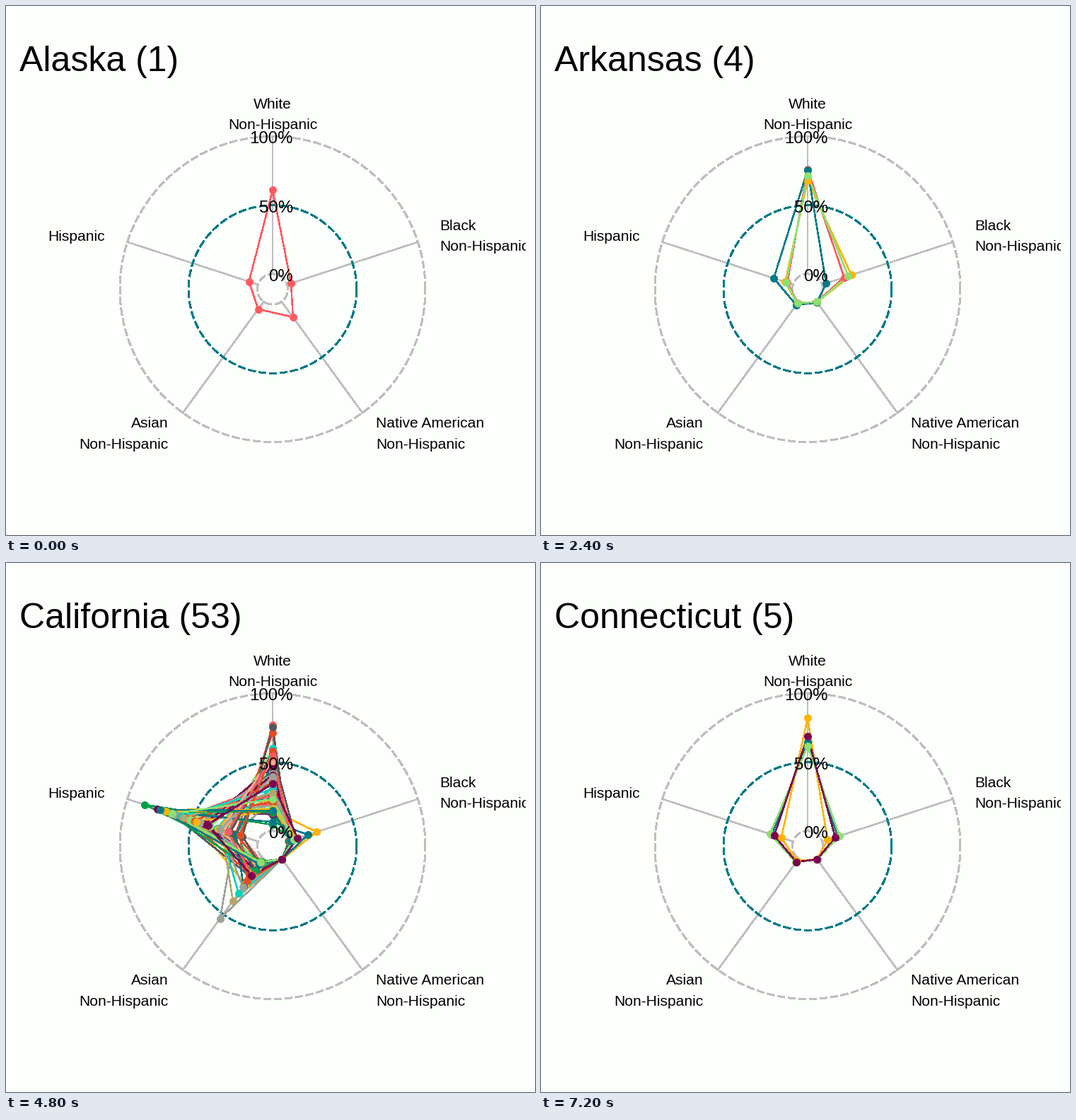
A matplotlib script that plays this animation: 748 by 748 pixels, repeating every 8 s.

```python
import numpy as np
import matplotlib.pyplot as plt
from matplotlib.animation import FuncAnimation
from matplotlib.patches import Rectangle

SIZE, DPI = 748, 88
PX = 72 / DPI                      # points per pixel
CX, CY = 377, 400.5
R0, R100 = 21.6, 216
BACK, GRID, MID = "#fdfffc", "#bebebe", "#007a87"
PALETTE = ["#ff5a5f", "#ffb400", "#007a87", "#8ce071", "#7b0051", "#00d1c1",
           "#ffaa91", "#b4a76c", "#9ca299", "#565a5c", "#00a04b", "#e54c20"]
HOLD, STEP, LOOP = 1200, 400, 8000
ANGLES = np.arange(5) * 2 * np.pi / 5


def district(white, black, native=None, asian=None, hispanic=None):
    """Percent on each axis; shares not given follow from the remainder."""
    rest = 100 - white - black - (native or 0)
    if asian is not None:
        hispanic = rest - asian - 1 - .06 * white
    elif hispanic is None:
        hispanic = rest * (.58 + .005 * rest)
    left = rest - hispanic
    if asian is None:
        asian = .45 * left
    if native is None:
        native = .1 * left
    return white, black, native, asian, hispanic


def state(whites, slope, base, **special):
    """Black share is linear in the non-white share; special holds outliers."""
    rows = []
    for i, white in enumerate(whites, 1):
        shares = {"black": base + slope * (100 - white)}
        shares.update(special.get(f"d{i}", {}))
        rows.append(district(white, **shares))
    return rows


def large_state(count=53):
    """Seeded spread of districts around a few fixed outer ones."""
    rng = np.random.default_rng(4)
    whites = rng.permutation(np.linspace(12, 60, count))
    asians = np.minimum(3 + rng.exponential(9, count), 31)
    blacks = rng.uniform(1.5, 8, count)
    fixed = {1: (77, 1, 3), 9: (23, 2.5, 54), 12: (71.5, 1.5, 4),
             14: (16, 4, 3), 20: (27, 4, 38), 34: (75.5, 1.5, 5),
             35: (4.5, 4.5, 2.5), 38: (15, 22.5, 13), 39: (6.5, 16, 6),
             48: (58, 3, 20), count: (34.5, 8, 15)}
    rows = []
    for i, shares in enumerate(zip(whites, blacks, asians), 1):
        white, black, asian = fixed.get(i, shares)
        rows.append(district(white, black, native=.5, asian=asian))
    return rows


STATES = [
    ("Alaska", state([61], 0, 3, d1=dict(native=14, hispanic=7))),
    ("Alabama", state([66, 62, 68, 84, 73, 76, 32], 1.05, -8)),
    ("Arkansas", state([76, 68, 75.5, 71.5], .7, 0, d3=dict(black=3))),
    ("Arizona", state([48, 61, 27, 74, 71, 72, 20, 69, 56], .07, 1,
                      d1=dict(black=2, native=22))),
    ("California", large_state()),
    ("Colorado", state([58, 82.5, 70, 72, 71.5, 61, 64], .3, -4)),
    ("Connecticut", state([64, 82, 65, 61.5, 69], .45, -4)),
]

fig = plt.figure(figsize=(SIZE / DPI, SIZE / DPI), dpi=DPI, facecolor=BACK)
ax = fig.add_axes([0, 0, 1, 1])
ax.set(xlim=(0, SIZE), ylim=(SIZE, 0))
ax.axis("off")


def polar(r, angle):
    """Pixel position, angle clockwise from the top."""
    return CX + r * np.sin(angle), CY - r * np.cos(angle)


def radius(percent):
    return R0 + (R100 - R0) * np.asarray(percent) / 100


def stroke(x, y, color, zorder, **style):
    return ax.plot(x, y, color=color, lw=1.5 * PX, zorder=zorder,
                   antialiased=False, **style)


def label(x, y, text, size, ha="left"):
    t = ax.text(x, y, text, fontsize=size * PX, family="Liberation Sans",
                color="black", ha=ha, va="baseline", zorder=6, clip_on=True)
    t.set_clip_path(Rectangle((0, 0), 735, SIZE, transform=ax.transData))
    return t


def draw_grid():
    for a in ANGLES:
        stroke(*polar(np.array([R0, R100]), a), GRID, 1)
    turn = np.pi / 2 - np.linspace(0, 2 * np.pi, 181)
    for percent, color in ((0, GRID), (50, MID), (100, GRID)):
        stroke(*polar(radius(percent), turn), color, 2, ls=(0, (7, 3)))
        label(406, 389 - 1.95 * percent, f"{percent}%", 24, "right")


def draw_labels():
    for x, y, name, ha in ((377, 144.5, "White", "center"),
                           (613, 316.5, "Black", "left"),
                           (523, 596, "Native American", "left"),
                           (230, 596, "Asian", "right")):
        label(x, y, name, 21, ha)
        label(x, y + 29.6, "Non-Hispanic", 21, ha)
    label(140, 331.5, "Hispanic", 21, "right")


def draw_state(rows):
    artists = []
    for i, row in enumerate(rows):
        color = PALETTE[i % len(PALETTE)]
        x, y = polar(radius(row), ANGLES)
        artists += stroke(np.append(x, x[0]), np.append(y, y[0]), color, 3)
        artists += ax.plot(x, y, "o", color=color, ms=11 * PX, mew=0, zorder=4)
    return artists


draw_grid()
draw_labels()
title = label(19.5, 92, "", 50)
groups = [draw_state(rows) for _, rows in STATES]


def update(frame):
    current = frame * STEP // HOLD
    name, rows = STATES[current]
    title.set_text(f"{name} ({len(rows)})")
    for i, group in enumerate(groups):
        for artist in group:
            artist.set_visible(i == current)
    return []


anim = FuncAnimation(fig, update, frames=LOOP // STEP, interval=STEP,
                     repeat=True, repeat_delay=0, blit=False)
plt.show()
```
